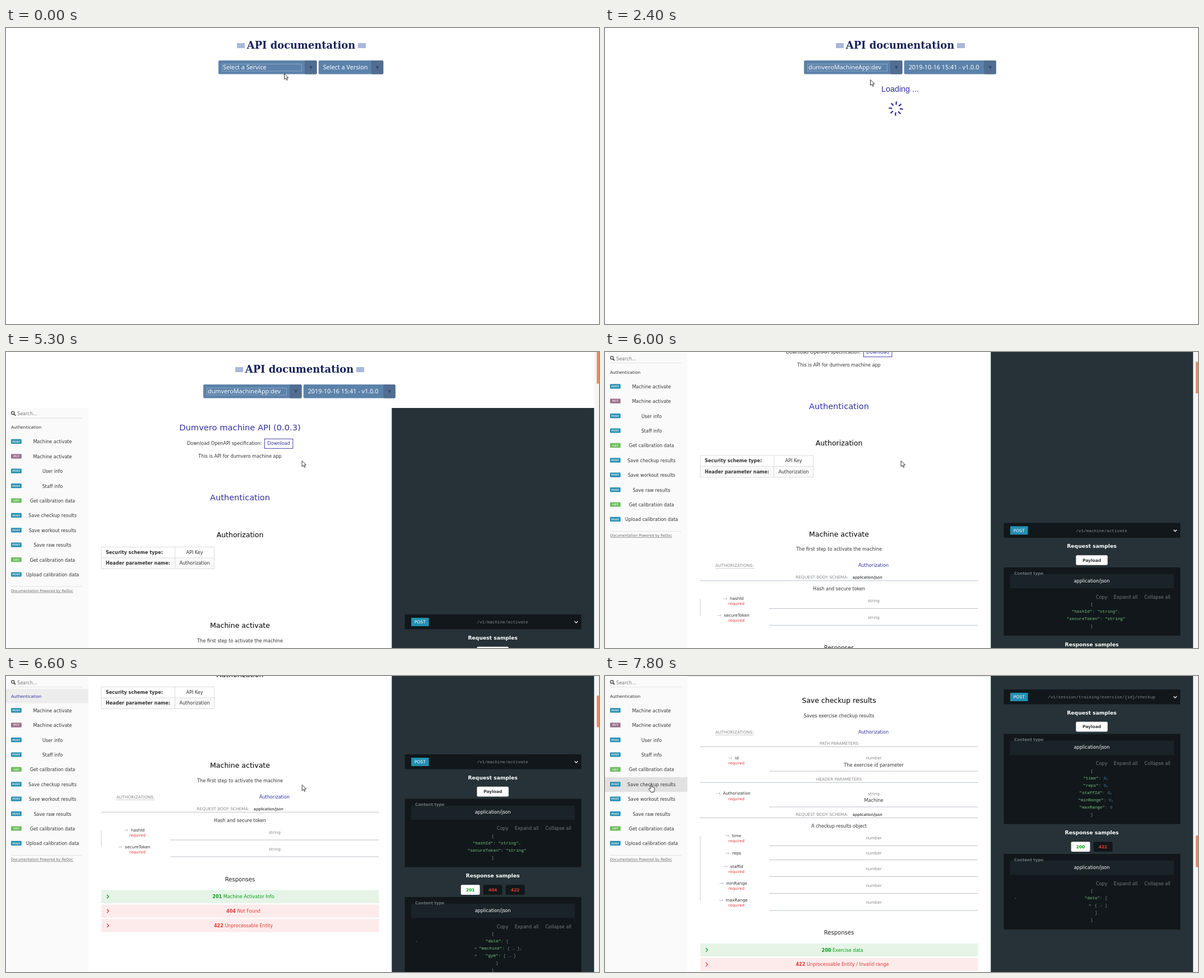
Animation, 1058 px wide and 529 px high, one loop 8 s. Source, as an HTML page:

```html
<!DOCTYPE html>
<html lang="en">
<head>
<meta charset="utf-8">
<title>API documentation</title>
<style>
html, body { margin: 0; height: 100%; overflow: hidden; background: #fff; }
svg { display: block; width: 100vw; height: 100vh; font-family: "DejaVu Sans", sans-serif; text-anchor: middle; fill: #333; }
text { white-space: pre; }
.left { text-anchor: start; }
.bold { font-weight: bold; }
.ui { font-family: "Noto Sans", sans-serif; text-anchor: start; fill: #fff; }
.serif { font-family: "DejaVu Serif", serif; font-weight: bold; }
.mono { font-family: "Liberation Mono", monospace; fill: #828b8f; }
</style>
</head>
<body>
<svg id="stage" viewBox="0 0 1058 529"></svg>
<script>
const BLUE = '#32329f', RED = '#e53935', GREEN = '#00a013', DARK = '#11171a', SELECT = '#5c82aa';
const MID = 417.5, RIGHT = 868.5, CHECKUP_TOP = 2680;
const METHODS = { POST: '#248fb2', PUT: '#9b708b', GET: '#6bbd5b' };

// Text is placed by the vertical middle of its capitals.
const text = (x, y, s, size = 8.1, attrs = '') =>
  `<text x="${x}" y="${y + size * 0.36}" font-size="${size}" ${attrs}>${s}</text>`;
const rect = (x, y, w, h, fill, attrs = '') =>
  `<rect x="${x}" y="${y}" width="${w}" height="${h}" fill="${fill}" ${attrs}/>`;
const line = (x1, y1, x2, y2, color, width = 0.8) =>
  `<path d="M${x1} ${y1}L${x2} ${y2}" stroke="${color}" stroke-width="${width}"/>`;
const stroke = (d, color, width = 1.3) =>
  `<path d="${d}" fill="none" stroke="${color}" stroke-width="${width}"/>`;
const fill = color => `fill="${color}"`;

const pen = document.createElement('canvas').getContext('2d');
function textWidth(s, size) {
  pen.font = `${size}px "DejaVu Sans", sans-serif`;
  return pen.measureText(s).width;
}

// Header with the two select boxes
function selectBox(x, width, label, inset) {
  const split = x + width - 21.5;
  return rect(x, 58, width, 24.5, SELECT, 'rx="2"') +
    rect(split, 58, 21.5, 24.5, '#516d91', 'rx="2"') +
    `<path d="M${split + 8} 68h6l-3 6z" fill="#344d6c"/>` +
    text(x + inset, 70.5, label, 10.8, 'class="ui"');
}
function selects(id, x, service, version, versionWidth) {
  return `<g id="${id}">` + selectBox(x, 175.5, service, 8) +
    rect(x + 6.5, 64.5, 142, 12.5, 'none', 'stroke="#b9cbe0" stroke-width=".8" stroke-dasharray="1 .6"') +
    selectBox(x + 178.7, versionWidth, version, 8) + '</g>';
}
const header = () => '<g id="header">' +
  text(526.5, 30.5, 'API documentation', 17.9, 'class="serif" fill="#17235a"') +
  rect(412, 27, 14, 9, '#a9b7da') + rect(628, 27, 14, 9, '#a9b7da') +
  selects('unset', 379, 'Select a Service', 'Select a Version', 115.5) +
  selects('chosen', 355, 'dumveroMachineApp:dev', '2019-10-16 15:41 - v1.0.0', 164) + '</g>';

const popup = () => '<g id="popup">' +
  rect(379, 82.5, 175.5, 60, SELECT, 'style="filter:drop-shadow(0 1px 2px #0006)"') +
  rect(379, 82.5, 175.5, 20, '#42648c', 'id="hover"') +
  ['dev', 'test', 'prod'].map((tag, i) =>
    text(387, 92.5 + i * 20, 'dumveroMachineApp:' + tag, 10.8, 'class="ui"')).join('') + '</g>';

const loading = () => '<g id="loading">' + text(526.5, 108.5, 'Loading ...', 14.4,
  `fill="${BLUE}" style="font-family:'Liberation Sans',sans-serif"`) + '<g id="spinner">' +
  Array.from({ length: 8 }, (_, i) =>
    `<path d="M0-6.8V-12.6" stroke="${BLUE}" stroke-width="2.3" transform="rotate(${i * 45})"/>`).join('') + '</g></g>';

// Sidebar
const badge = (y, method) => rect(9, y - 4.2, 18.7, 8.2, METHODS[method], 'rx="1"') +
  text(18.4, y, method, 4.6, 'class="serif" fill="#fff"');
const MENU = [
  ['POST', 'Machine activate'], ['PUT', 'Machine activate'], ['POST', 'User info'],
  ['POST', 'Staff info'], ['GET', 'Get calibration data'], ['POST', 'Save checkup results'],
  ['POST', 'Save workout results'], ['POST', 'Save raw results'],
  ['GET', 'Get calibration data'], ['POST', 'Upload calibration data']
];
const sidebar = () => '<g id="sidebar">' + rect(0, 100, 147, 700, '#fafafa') +
  rect(0, 121.5, 147, 25.7, '#ededed', 'id="authRow"') +
  rect(0, 279.4, 147, 26.3, '#e1e1e1', 'id="checkupRow"') +
  `<circle cx="12.3" cy="109" r="2.6" fill="none" stroke="#333" stroke-width="1.2"/>` +
  line(14.2, 111, 17, 113.8, '#333', 1.5) +
  text(20, 110.5, 'Search...', 8.1, 'class="left" fill="#777"') +
  line(9, 118.3, 136, 118.3, '#dcdcdc') +
  text(9, 134.5, 'Authentication', 7.4, 'class="left" id="authText"') +
  MENU.map(([method, name], i) => {
    const y = 160.5 + i * 26.4;
    return badge(y - 0.5, method) + text(83, y, name);
  }).join('') +
  line(9, 419, 136, 419, '#ddd') +
  text(9, 426.5, 'Documentation Powered by ReDoc', 6.4, 'class="left" fill="#666" text-decoration="underline"') + '</g>';

// Documentation body
const heading = (y, s, size = 12.5, color = '#000') => text(MID, y, s, size, fill(color));
const intro = () => heading(134.5, 'Dumvero machine API (0.0.3)', 14.7, BLUE) +
  text(323, 163.5, 'Download OpenAPI specification:', 8.1, 'class="left"') +
  rect(461.4, 155.3, 50.5, 17, 'none', `stroke="${BLUE}" stroke-width=".9"`) +
  text(486.7, 163.5, 'Download', 8.2, fill(BLUE)) +
  text(MID, 186.5, 'This is API for dumvero machine app') +
  heading(260, 'Authentication', 14.6, BLUE) + heading(326, 'Authorization') +
  rect(170, 368, 201.5, 19.5, '#fafafa') +
  stroke('M170 348.5h201.5v39H170zM170 368h201.5M301.5 348.5v39', '#d5d5d5', 0.8) +
  text(178, 358, 'Security scheme type:', 8.1, 'class="left bold"') + text(336.5, 358, 'API Key') +
  text(178, 377.5, 'Header parameter name:', 8.1, 'class="left bold"') + text(336.5, 377.5, 'Authorization');

const RULE = '#aab2ba';
function param([y, ruleY, name, type, { desc, optional } = {}]) {
  const nameY = optional ? y : y - (desc ? 0.5 : 4);
  const x = 235 - textWidth(name, 7.35) / 2 - 12;
  return stroke(`M${x} ${nameY + 0.5}h6m0-2v4`, '#a5a5cf', 0.7) +
    text(235, nameY, name, 7.35) +
    (optional ? '' : text(234.5, nameY + 9.6, 'required', 6.9, fill(RED))) +
    text(479.5, y, type, 7.35, fill('#888')) + (desc ? text(479.5, y + 12.1, desc) : '') +
    line(293, ruleY, 665.5, ruleY, RULE);
}
function paramBlock({ y, title, body, params }) {
  const first = params[0][0] - 3, last = params[params.length - 1][0] - 3;
  const label = body
    ? 'REQUEST BODY SCHEMA:<tspan dx="8" font-size="6.7" fill="#000">application/json</tspan>' : title;
  return text(MID, y, label, 7.35, fill('#888')) + line(170, y + 6.3, 665.5, y + 6.3, RULE) +
    (body ? text(MID, y + 20.8, body) + line(170, first, 170, last, '#bdbde0') : '') +
    params.map(param).join('');
}
const response = (y, [code, name], i) => {
  const color = i ? RED : GREEN;
  y += i * 25.8;
  return rect(170, y, 495.5, 23.3, i ? '#fdebeb' : '#e5f4e7') +
    stroke(`M180 ${y + 8.3}l3.3 3.3-3.3 3.3`, color) +
    text(423.5, y + 11.7, `<tspan class="bold">${code}</tspan> ${name}`, 8.1, fill(color));
};

const highlight = s => s.replace(/"[^"]*"|\b\d+\b/g, part =>
  `<tspan fill="${part[0] === '"' ? '#78c384' : '#42769a'}">${part}</tspan>`);
const codeEnd = (y, lines) => y + 104 + 13 * (lines.length - 1) + 17;

// Each code line is [indent, text, fold mark, x of the fold mark].
function samples(y, title, tabs, lines) {
  const tabWidth = tabs[0] === 'Payload' ? 56.5 : 33.8;
  return text(RIGHT, y, title, 9.2, 'class="bold" fill="#fff"') +
    tabs.map((tab, i) => {
      const x = RIGHT + (i - (tabs.length - 1) / 2) * 40;
      const color = tab === 'Payload' ? '#333' : i ? RED : GREEN;
      return rect(x - tabWidth / 2, y + 16.3, tabWidth, 17.6, i ? DARK : '#fff', 'rx="2"') +
        text(x, y + 25.2, tab, 7.5, `class="bold" fill="${color}"`);
    }).join('') +
    rect(711.5, y + 38, 315, codeEnd(y, lines) - y - 38, DARK) +
    rect(722.5, y + 50, 292.5, 25.5, '#1a2327') +
    text(730, y + 48.3, 'Content type', 7.1, 'class="left bold" fill="#6c777b"') +
    text(RIGHT, y + 62, 'application/json', 8.1, fill('#fff')) +
    [[886, 'Copy'], [929, 'Expand all'], [985.5, 'Collapse all']].map(([x, s]) =>
      text(x, y + 90.7, s, 8.1, fill('#747c80'))).join('') +
    lines.map(([indent, s, mark, markX], i) => {
      const lineY = y + 103.6 + i * 13;
      return text(RIGHT + indent * 7.5, lineY, highlight(s), 7.6, 'class="mono"') +
        (mark ? text(markX, lineY, mark, 7.6, 'class="mono"') : '');
    }).join('');
}
function endpoint(top, { title, desc, path, blocks, responsesY, responses, request, reply }) {
  return `<g transform="translate(0 ${top})">` + heading(43.7, title) + text(MID, 70.7, desc) +
    text(197, 100, 'AUTHORIZATIONS:', 7.4, 'class="left" fill="#888"') +
    line(197, 105.3, 266, 105.3, '#bbb') + text(479, 100, 'Authorization', 8.1, fill(BLUE)) +
    blocks.map(paramBlock).join('') +
    heading(responsesY, 'Responses', 10.05, '#222') +
    responses.map((r, i) => response(responsesY + 19.7, r, i)).join('') +
    rect(711.5, 24, 315, 26.5, DARK, 'rx="1"') + rect(723, 30, 31.5, 15, METHODS.POST) +
    text(738.8, 37.5, 'POST', 7.6, fill('#fff')) +
    text(886, 37.5, path, 7.62, 'class="mono"') + stroke('M1014.5 36.3l2.8 2.8 2.8-2.8', '#fff') +
    samples(65.5, 'Request samples', ['Payload'], request) +
    samples(codeEnd(65.5, request) + 15.5, 'Response samples', responses.map(r => r[0]), reply) + '</g>';
}
const activate = {
  title: 'Machine activate', desc: 'The first step to activate the machine', path: '/v1/machine/activate',
  blocks: [{ y: 121, body: 'Hash and secure token',
    params: [[163, 177, 'hashId', 'string'], [193, 207, 'secureToken', 'string']] }],
  responsesY: 247,
  responses: [['201', 'Machine Activator Info'], ['404', 'Not Found'], ['422', 'Unprocessable Entity']],
  request: [[0, '{'], [1, '"hashId": "string",'], [1, '"secureToken": "string"'], [0, '}']],
  reply: [[0, '{'], [1, '"data": {', '-', 732], [1.9, '"machine": { … },', '+', 838],
    [1.9, '"gym": { … }', '+', 838], [1, '}'], [0, '}']]
};
const fields = ['time', 'reps', 'staffId', 'minRange', 'maxRange'];
const checkup = {
  title: 'Save checkup results', desc: 'Saves exercise checkup results',
  path: '/v1/session/training/exercise/{id}/checkup',
  blocks: [
    { y: 120, title: 'PATH PARAMETERS', params: [[146.5, 170, 'id', 'number', { desc: 'The exercise id parameter' }]] },
    { y: 184, title: 'HEADER PARAMETERS', params: [[210, 234, 'Authorization', 'string', { desc: 'Machine' }]] },
    { y: 247, body: 'A checkup results object', params: [
      [289, 303.3, 'time', 'number'], [316.3, 328.6, 'reps', 'number', { optional: true }],
      [344, 358.4, 'staffId', 'number'], [374, 388.6, 'minRange', 'number'], [404.3, 419, 'maxRange', 'number']] }
  ],
  responsesY: 458.3,
  responses: [['200', 'Exercise data'], ['422', 'Unprocessable Entity / Invalid range']],
  request: [[0, '{'], ...fields.map((f, i) => [1, `"${f}": 0${i < 4 ? ',' : ''}`]), [0, '}']],
  reply: [[0, '{'], [1, '"data": [', '-', 732], [2.2, '{ … }', '+', 865], [1, ']'], [0, '}']]
};
const docs = () => '<g id="docs"><g id="body">' + rect(688.3, 100, 361.2, 4000, '#263238') +
  intro() + endpoint(445, activate) +
  line(147, CHECKUP_TOP + 0.3, 1049.5, CHECKUP_TOP + 0.3, '#0003') + endpoint(CHECKUP_TOP, checkup) + '</g>' +
  sidebar() + rect(1049.5, 0, 8.5, 529, '#f6f5f4') + rect(1054, 0, 4, 56.5, '#eb8a62', 'id="thumb"') + '</g>';

const cursor = () => '<g id="cursor" fill="#fff" stroke="#222" stroke-width=".9" stroke-linejoin="round">' +
  '<path id="arrow" d="M.5.5V10.7L2.9 8.5 4.6 12.3 6.3 11.6 4.7 7.9H8z"/>' +
  '<path id="hand" d="M.2 8V1Q1.2-.4 2.2 1V5Q3.4 4.2 4.2 5.3 5.4 4.6 6 5.8 7.4 5.4 7.4 7V10L6.2 14H.6L-2.4 9.5Q-2.6 7.2-1.2 7.4z"/></g>';

document.getElementById('stage').innerHTML = header() + popup() + loading() + docs() + cursor();
const el = id => document.getElementById(id);

// Keys are [time, values...]; each holds until the next one.
const CURSOR = [
  [0, 496, 81], [400, 494, 75], [500, 491.5, 68], [1400, 488, 74], [1500, 483, 80], [1600, 478, 87],
  [1700, 473, 92], [3100, 560.5, 102.5], [3700, 560, 102], [4300, 551, 99], [4600, 527, 86],
  [5300, 527.6, 194], [7200, 81, 193.5]
];
const SCROLL = [[0, 0], [5600, 109], [6000, 163.6], [6300, 274], [6600, 329], [7200, 383], [7800, CHECKUP_TOP]];
const SPIN = [[0, 4], [2500, 20], [3100, 36]];
const stepAt = (keys, t) => keys.filter(key => key[0] <= t).pop().slice(1);
const show = (id, on) => el(id).setAttribute('display', on ? 'inline' : 'none');
const move = (id, x, y) => el(id).setAttribute('transform', `translate(${x} ${y})`);

function draw() {
  const t = performance.now() % 8000;
  const [scroll] = stepAt(SCROLL, t);
  const [x, y] = stepAt(CURSOR, t);
  const loaded = t >= 3400, authActive = scroll >= 216 && t < 7800;
  show('unset', t < 2400);
  show('chosen', t >= 2400);
  show('popup', t >= 1200 && t < 2400);
  show('hover', y > 82);
  show('loading', t >= 2400 && !loaded);
  show('docs', loaded);
  show('authRow', authActive);
  el('authText').setAttribute('fill', authActive ? BLUE : '#333');
  show('checkupRow', t >= 7200);
  show('arrow', t < 7500);
  show('hand', t >= 7500);
  el('spinner').setAttribute('transform', `translate(519 144) rotate(${stepAt(SPIN, t)})`);
  move('header', loaded ? -3 : 0, -scroll);
  move('body', 0, -scroll);
  move('sidebar', 0, -Math.min(scroll, 98.6));
  move('thumb', 0, scroll * 0.1064);
  move('cursor', x, y);
  requestAnimationFrame(draw);
}
draw();
</script>
</body>
</html>
```
